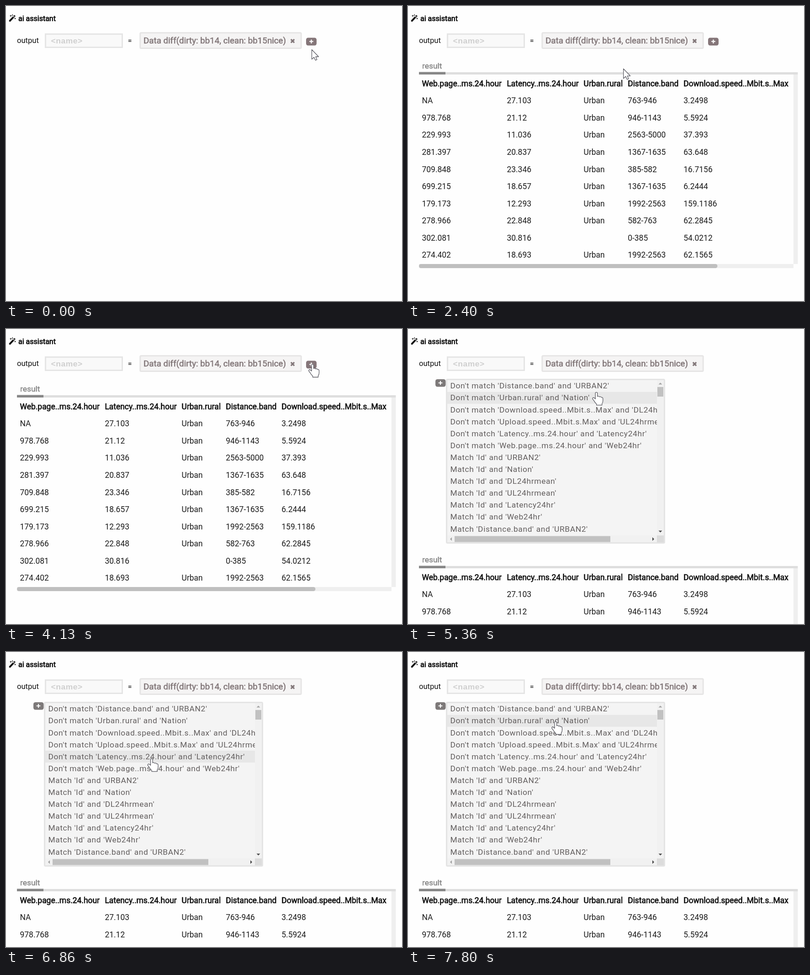
An HTML page that plays this animation: 867 by 646 pixels, repeating every 8 s.

```html
<!DOCTYPE html>
<html lang="en">
<head>
<meta charset="utf-8">
<title>ai assistant</title>
<style>
  html, body { margin: 0; width: 100%; height: 100%; overflow: hidden; background: #fefefe; }
  svg { display: block; width: 867px; height: 646px; }
  text { font-family: Roboto, sans-serif; white-space: pre; }
  .label { font-size: 16px; fill: #111; }
  .field { font-size: 16.6px; fill: #111; }
  .strong { fill: #000; stroke: #000; stroke-width: .65px; }
  .cell { font-size: 17.45px; fill: #1c1c1c; }
  .chip { font-size: 18.75px; fill: #83787a; stroke: #83787a; stroke-width: .6px; }
  .placeholder { font: bold 17.4px "Liberation Sans", Arial, sans-serif; letter-spacing: .6px; fill: #cfcfcf; }
  .option { font-size: 17.4px; letter-spacing: .62px; fill: #625e5e; }
  .tab { font-size: 17.4px; fill: #888; stroke: #888; stroke-width: .5px; }
  .pointer { fill: #fff; stroke: #5c5c64; stroke-width: 1.3px; stroke-linejoin: round; }
</style>
</head>
<body>
<svg viewBox="0 0 867 646">
  <defs>
    <clipPath id="listClip"><rect x="86" y="112" width="459" height="340"/></clipPath>
  </defs>

  <g id="wand">
    <path d="M8.6 32.4 18.4 22" stroke="#111" stroke-width="4" stroke-linecap="round"/>
    <path d="M15.8 24.3 18 22" stroke="#fefefe" stroke-width="1.3"/>
    <path d="M10.5 19.5v4M8.5 21.5h4M14.2 18.6v2.4M13 19.8h2.4M20 26v3M18.5 27.5h3" stroke="#111" stroke-width="1.1"/>
  </g>
  <text class="label strong" x="27" y="33">ai assistant</text>

  <text class="field" x="24" y="81">output</text>
  <rect x="86.5" y="61.5" width="168" height="29" fill="#f9f9f9" stroke="#e5e5e5" stroke-width="3"/>
  <text class="placeholder" x="98.5" y="81.5">&lt;name&gt;</text>
  <text class="label" x="266.7" y="81.5">=</text>
  <rect x="293.8" y="58.8" width="352.4" height="33.7" rx="2" fill="#f5f4f4" stroke="#e6e5e5" stroke-width="3"/>
  <text class="chip" x="301" y="82">Data diff(dirty: bb14, clean: bb15nice)</text>
  <path d="M623.8 73l7.4 7.4M631.2 73l-7.4 7.4" stroke="#83787a" stroke-width="3.2"/>

  <g id="addTop">
    <rect x="657" y="69.5" width="23" height="17" rx="4.5" fill="#857679"/>
    <path d="M668.5 73.5v8.5M664.2 77.7h8.6" stroke="#fff" stroke-width="2.2"/>
  </g>

  <g id="menu">
    <rect x="60" y="110" width="22.5" height="16.5" rx="4.5" fill="#7d7979"/>
    <path d="M71 113.7v8.6M66.7 118h8.6" stroke="#fff" stroke-width="2.2"/>
    <rect x="84.5" y="110.5" width="477" height="358" rx="2" fill="#f4f4f4" stroke="#e4e4e4" stroke-width="3"/>
    <g clip-path="url(#listClip)">
      <rect id="hover" x="86" width="459" fill="#e7e7e7"/>
      <g id="options"></g>
    </g>
    <path d="M545 112h15v340h-15zM86 452h459v15H86z" fill="#f1f1f1"/>
    <path d="M545 452h15v15h-15z" fill="#dcdcdc"/>
    <path d="M546 127h13v21h-13zM102 453.5h341v13H102z" fill="#c1c1c1"/>
    <path d="M548.5 121.5h8l-4-4zM96 456v8l-4-4z" fill="#a3a3a3"/>
    <path d="M548.5 441.5h8l-4 4zM535 456v8l4-4z" fill="#484848"/>
  </g>

  <g id="result">
    <text class="tab" x="31" y="136.5">result</text>
    <rect x="24" y="145" width="829.5" height="5" fill="#dedede"/>
    <rect x="24" y="144.5" width="58" height="5.5" fill="#878787"/>
    <path d="M844 150h9.5v415H844zM24 565h820v9H24z" fill="#efefef"/>
    <rect x="24" y="565" width="653.5" height="9" rx="4.5" fill="#bfbfbf"/>
    <g id="table"></g>
  </g>

  <path id="arrow" class="pointer" d="M.5 .5V21.6L5.4 17.2 8.4 23.8 11.8 22.4 9 16H15.4Z"/>
  <path id="hand" class="pointer" d="M-2 2Q-2 .4 .3 .4 2.5 .4 2.5 2.5V9.5Q5 8 7 10.5 9.5 9 11.2 11.6 14.5 11 14.5 14.5V19Q14.5 23 12.5 25V28.5H.5V26Q-3 23-5 19L-8 15.2Q-8.8 12.5-6.2 12-4.5 12-2 15Z"/>
</svg>
<script>
const LOOP = 8000, ROW = 26.1, LIST_TOP = 111.6;
const byId = id => document.getElementById(id);
const show = (el, on) => { el.style.display = on ? '' : 'none'; };

function addText(parent, className, x, y, content) {
  const node = document.createElementNS('http://www.w3.org/2000/svg', 'text');
  node.setAttribute('class', className);
  node.setAttribute('x', x);
  node.setAttribute('y', y);
  node.textContent = content;
  parent.append(node);
}

const columns = [30.5, 216.4, 384.6, 481.2, 603.3];
const rows = `Web.page..ms.24.hour|Latency..ms.24.hour|Urban.rural|Distance.band|Download.speed..Mbit.s..Max
NA|27.103|Urban|763-946|3.2498
978.768|21.12|Urban|946-1143|5.5924
229.993|11.036|Urban|2563-5000|37.393
281.397|20.837|Urban|1367-1635|63.648
709.848|23.346|Urban|385-582|16.7156
699.215|18.657|Urban|1367-1635|6.2444
179.173|12.293|Urban|1992-2563|159.1186
278.966|22.848|Urban|582-763|62.2845
302.081|30.816||0-385|54.0212
274.402|18.693|Urban|1992-2563|62.1565`.split('\n');
rows.forEach((row, r) => row.split('|').forEach((value, c) =>
  addText(byId('table'), r ? 'cell' : 'cell strong', columns[c], 175.9 + 37.53 * r, value)));

const targets = ['URBAN2', 'Nation', 'DL24hrmean', 'UL24hrmean', 'Latency24hr', 'Web24hr'];
const sources = ['Distance.band', 'Urban.rural', 'Download.speed..Mbit.s..Max',
  'Upload.speed..Mbit.s.Max', 'Latency..ms.24.hour', 'Web.page..ms.24.hour'];
const options = [
  ...sources.map((name, i) => `Don't match '${name}' and '${targets[i]}'`),
  ...targets.map(name => `Match 'Id' and '${name}'`),
  `Match 'Distance.band' and 'URBAN2'`
];
options.forEach((option, i) => addText(byId('options'), 'option', 92.4, 130.3 + ROW * i, option));

// Pointer path: time, x, y
const path = [
  [0, 669, 95], [1900, 669, 95], [2100, 624.5, 135], [2270, 624.5, 135],
  [2400, 472, 137], [2560, 400, 148], [2700, 390, 162], [2880, 425, 183],
  [3000, 460, 187], [3115, 497, 183], [3300, 595, 166], [3550, 650, 122],
  [3780, 668, 88], [3930, 670, 82], [4000, 670, 82], [4130, 671, 77],
  [5100, 671, 77], [5360, 413, 138], [5530, 335, 146], [5830, 335, 146],
  [6150, 322, 115], [6400, 316, 160], [6660, 317, 193], [6700, 317, 195],
  [6860, 318.5, 233], [7060, 320, 267], [7180, 320, 267], [7800, 323, 152], [LOOP, 323, 152]
];

const same = (a, b) => a[1] === b[1] && a[2] === b[2];

function slope(i, axis) {
  const before = path[i - 1], here = path[i], after = path[i + 1];
  if (!before || !after || same(before, here) || same(here, after)) return 0;
  return (after[axis] - before[axis]) / (after[0] - before[0]);
}

function pointerAt(t) {
  const i = path.findIndex((p, k) => k && t <= p[0]) - 1;
  const a = path[i], b = path[i + 1], span = b[0] - a[0], u = (t - a[0]) / span;
  const ease = u * u * (3 - 2 * u);
  return [1, 2].map(axis => a[axis] + (b[axis] - a[axis]) * ease +
    span * u * (1 - u) * ((1 - u) * slope(i, axis) - u * slope(i + 1, axis)));
}

function draw(t) {
  const open = t >= 4600, [x, y] = pointerAt(t);
  show(byId('result'), t >= 930);
  show(byId('addTop'), !open);
  show(byId('menu'), open);
  byId('result').setAttribute('transform', `translate(0 ${open ? 374 : 0})`);

  const overAdd = !open && x > 657 && x < 680 && y > 69 && y < 87;
  const overList = open && x > 86 && x < 545 && y > 112 && y < 452;
  show(byId('hover'), overList);
  if (overList) {
    const row = Math.floor((y - LIST_TOP) / ROW);
    const top = Math.max(114, LIST_TOP + ROW * row);
    byId('hover').setAttribute('y', top);
    byId('hover').setAttribute('height', LIST_TOP + ROW * (row + 1) - top);
  }

  const overLink = overAdd || overList;
  show(byId('hand'), overLink);
  show(byId('arrow'), !overLink);
  byId(overLink ? 'hand' : 'arrow').setAttribute('transform', `translate(${x} ${y})`);
}

const start = performance.now();
function tick() {
  draw((performance.now() - start) % LOOP);
  requestAnimationFrame(tick);
}
tick();
</script>
</body>
</html>
```
